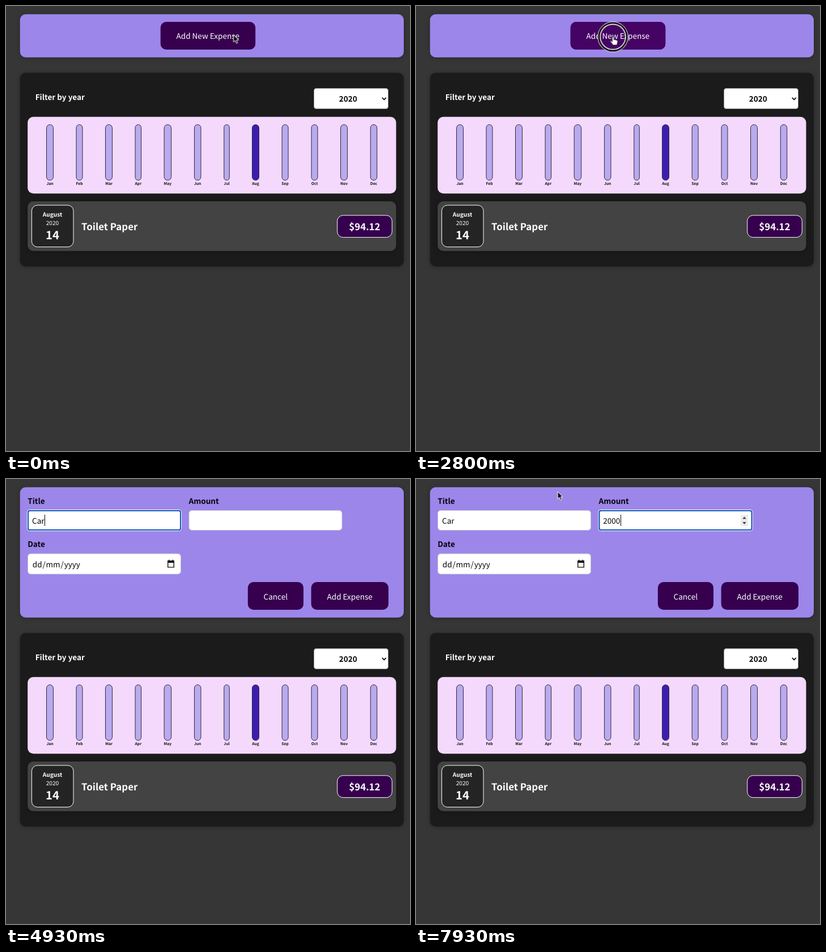
Animation, 713 px wide and 786 px high, one loop 8000 ms. Source, as an HTML page:

```html
<!DOCTYPE html>
<html lang="en">
<head>
<meta charset="utf-8">
<title>Expense tracker</title>
<style>
html, body { margin: 0; width: 100%; height: 100%; overflow: hidden; background: #363636; }
svg { display: block; width: 713px; height: 786px; }
text {
  font: 13.54px "Noto Sans CJK JP", "Noto Sans CJK SC", "Noto Sans CJK KR", "Noto Sans", sans-serif;
  fill: #fff; text-rendering: geometricPrecision; white-space: pre;
}
.bold { font-weight: 700; }
.mid { text-anchor: middle; }
.dark { fill: #060308; }
.big { font-size: 16.92px; }
.small { font-size: 10.15px; }
.day { font-size: 20.3px; }
.month { font-size: 6.77px; fill: #111; }
.shadow { filter: drop-shadow(0 1px 3.5px rgba(0, 0, 0, .28)); }
.lilac { fill: #9c86ea; }
.btn { fill: #36004f; }
.field { fill: #fff; stroke: #c4c0d4; }
.bar { fill: #b9a9ee; stroke: #2c2a36; }
.full { fill: #3d1db0; }

/* Everything that switches: hidden at rest, shown by stepped keyframes */
.step { opacity: 0; animation: 8s step-end infinite; }
tspan.step { opacity: 1; fill-opacity: 0; }
#closed { animation-name: closed; }
#open { animation-name: open; }
#hover { animation-name: hover; }
#list { animation: shift 8s step-end infinite; }
#ring { animation-name: ring; }
#arrow { animation-name: arrow; }
#hand { animation-name: hand; }
#beam { animation-name: beam; }
#focusTitle { animation-name: focusTitle; }
#focusAmount { animation-name: focusAmount; }
#spinner { animation-name: spinner; }
#caret { animation-name: blink, caretMove; }
#cursor { animation: path 8s linear infinite; }

@keyframes closed { 0% { opacity: 1 } 35.75%, 100% { opacity: 0 } }
@keyframes open { 35.75% { opacity: 1 } }
@keyframes hover { 31.5% { opacity: 1 } }
@keyframes shift { 35.75% { transform: translateY(154px) } }
@keyframes ring { 33.25% { opacity: 1 } 35.75% { opacity: 0 } 45% { opacity: 1 } 46.75% { opacity: 0 } }
@keyframes arrow {
  0% { opacity: 1 } 31.5% { opacity: 0 } 39.5% { opacity: 1 } 39.9% { opacity: 0 } 95.8%, 100% { opacity: 1 }
}
@keyframes hand { 31.5% { opacity: 1 } 35.75% { opacity: 0 } }
@keyframes beam {
  35.75% { opacity: 1 } 39.5% { opacity: 0 } 39.9% { opacity: 1 }
  57.45% { opacity: 0 } 93.3% { opacity: 1 } 95.8% { opacity: 0 }
}
@keyframes focusTitle { 45% { opacity: 1 } 66.25% { opacity: 0 } }
@keyframes focusAmount { 66.25% { opacity: 1 } }
@keyframes spinner { 35.75% { opacity: 1 } 39.5% { opacity: 0 } 66.25% { opacity: 1 } }
@keyframes blink {
  45% { opacity: 1 } 51.25% { opacity: 0 } 57.45% { opacity: 1 } 65.35% { opacity: 0 }
  66.25% { opacity: 1 } 72.5% { opacity: 0 } 78.3% { opacity: 1 } 89.6% { opacity: 0 } 95.85% { opacity: 1 }
}
@keyframes caretMove {
  0% { transform: translateX(46px) }
  57.45% { transform: translateX(54.6px) }
  58.3% { transform: translateX(62.3px) }
  59.1% { transform: translateX(67.5px) }
  66.25% { transform: translateX(330.5px) }
  78.3% { transform: translateX(338px) }
  80% { transform: translateX(345.5px) }
  81.6% { transform: translateX(353px) }
  83.3%, 100% { transform: translateX(360.5px) }
}
@keyframes path {
  0% { transform: translate(401.5px, 51px) }
  21.6% { transform: translate(358.5px, 54px) }
  28.4% { transform: translate(347.5px, 54.5px) }
  38% { transform: translate(347.5px, 54.5px); animation-timing-function: ease-in-out }
  43.75% { transform: translate(164px, 75px) }
  93.3% { transform: translate(164px, 75px); animation-timing-function: ease-in-out }
  99.1%, 100% { transform: translate(250px, 22.5px) }
}
/* Typed characters */
#k1 { animation-name: k1 } @keyframes k1 { 57.45% { fill-opacity: 1 } }
#k2 { animation-name: k2 } @keyframes k2 { 58.3% { fill-opacity: 1 } }
#k3 { animation-name: k3 } @keyframes k3 { 59.1% { fill-opacity: 1 } }
#k4 { animation-name: k4 } @keyframes k4 { 78.3% { fill-opacity: 1 } }
#k5 { animation-name: k5 } @keyframes k5 { 80% { fill-opacity: 1 } }
#k6 { animation-name: k6 } @keyframes k6 { 81.6% { fill-opacity: 1 } }
#k7 { animation-name: k7 } @keyframes k7 { 83.3% { fill-opacity: 1 } }
</style>
</head>
<body>
<svg viewBox="0 0 713 786">
  <rect width="713" height="786" fill="#363636"/>

  <g id="closed" class="step">
    <rect class="lilac shadow" x="24.7" y="14.5" width="677.3" height="76.3" rx="10"/>
    <rect class="btn" x="272.7" y="28" width="167.5" height="49" rx="10"/>
    <rect id="hover" class="step" fill="#450464" x="272.7" y="28" width="167.5" height="49" rx="10"/>
    <text class="mid" x="356.3" y="58.3">Add New Expense</text>
  </g>

  <g id="open" class="step">
    <rect class="lilac shadow" x="24.7" y="14.5" width="677.3" height="230.3" rx="10"/>
    <text class="bold dark" x="38.2" y="44">Title</text>
    <text class="bold dark" x="322.5" y="44">Amount</text>
    <text class="bold dark" x="38.2" y="120.3">Date</text>
    <rect class="field" x="38.5" y="55.5" width="270" height="35" rx="5"/>
    <rect class="field" x="323" y="55.5" width="270" height="35" rx="5"/>
    <rect class="field" x="38.5" y="132" width="270" height="36" rx="5"/>

    <g id="focusTitle" class="step" fill="none">
      <rect x="37.5" y="54.5" width="272" height="37" rx="4" stroke="#fff"/>
      <rect x="39" y="56" width="269" height="34" rx="3" stroke="#1354b4" stroke-width="2"/>
    </g>
    <g id="focusAmount" class="step" fill="none">
      <rect x="322" y="54.5" width="272" height="37" rx="4" stroke="#fff"/>
      <rect x="323.5" y="56" width="269" height="34" rx="3" stroke="#1354b4" stroke-width="2"/>
    </g>

    <g id="spinner" class="step">
      <rect x="573" y="63" width="13" height="20" fill="#ececec"/>
      <path d="M576.3 70.5l3.2-4 3.2 4zM576.3 76l3.2 4 3.2-4z" fill="#3c3c3c"/>
    </g>

    <text class="dark" x="46" y="78.8"><tspan id="k1" class="step">C</tspan><tspan id="k2" class="step">a</tspan><tspan id="k3" class="step">r</tspan></text>
    <text class="dark" x="330.3" y="78.8"><tspan id="k4" class="step">2</tspan><tspan id="k5" class="step">0</tspan><tspan id="k6" class="step">0</tspan><tspan id="k7" class="step">0</tspan></text>
    <rect id="caret" class="step" y="63" width="1" height="20" fill="#000"/>

    <text class="dark" x="46.8" y="155.8">dd<tspan dx=".85">/</tspan><tspan dx=".85">mm</tspan><tspan dx=".85">/</tspan><tspan dx=".85">yyyy</tspan></text>
    <path d="M285.7 144.7h10.6v11.2h-10.6z" fill="none" stroke="#111" stroke-width="1.4"/>
    <path d="M285 144h12v4h-12zM287 142.5h1.5v2H287zM293.5 142.5h1.5v2h-1.5z" fill="#111"/>

    <rect class="btn" x="426.8" y="182" width="98.2" height="49" rx="10"/>
    <text class="mid" x="475.8" y="212.5">Cancel</text>
    <rect class="btn" x="538.6" y="182" width="136.4" height="49" rx="10"/>
    <text class="mid" x="606.7" y="212.5">Add Expense</text>
  </g>

  <g id="list">
    <rect class="shadow" x="24.7" y="118" width="677.3" height="342" rx="10" fill="#1b1b1b"/>
    <text class="bold" x="51.7" y="166">Filter by year</text>
    <rect x="543.5" y="145.5" width="131" height="36" rx="4" fill="#fff" stroke="#8a8a8a"/>
    <text class="bold dark mid" x="603.7" y="169.2">2020</text>
    <path d="M663.8 161.8l3.5 3.6 3.5-3.6" fill="none" stroke="#111" stroke-width="1.8"/>

    <rect x="38.2" y="195.8" width="650.3" height="135.4" rx="10" fill="#f4d9fd"/>
    <g id="chart"></g>

    <rect class="shadow" x="38.2" y="345" width="650.3" height="87.7" rx="10" fill="#434343"/>
    <rect x="45.4" y="351.9" width="73.6" height="73.6" rx="10" fill="#242424" stroke="#fff"/>
    <text class="bold small mid" x="82" y="372">August</text>
    <text class="small mid" x="82" y="386.6">2020</text>
    <text class="bold day mid" x="82" y="412.2">14</text>
    <text class="bold big" x="133" y="396.4">Toilet Paper</text>
    <rect x="584.7" y="369.8" width="96.6" height="38.8" rx="10" fill="#36004f" stroke="#fff"/>
    <text class="bold big mid" x="632.9" y="396.4">$94.12</text>
  </g>

  <g id="cursor">
    <g id="ring" class="step" fill="none">
      <circle r="24.3" stroke="#fff" stroke-width="5.4"/>
      <circle r="24.6" stroke="#000" stroke-width="2.8"/>
    </g>
    <path id="arrow" class="step" d="M0 0v12.6l2.9-2.7 2.2 5 2.2-1-2.1-4.8h3.9z" fill="#0b0b0b" stroke="#fff" stroke-width="1"/>
    <path id="hand" class="step" d="M-1.5 1c0-1.8 2.7-1.8 2.9 0l.5 4.2c.4-1 2.3-.8 2.5.4.6-.8 2.1-.4 2.2.7.9-.5 1.8 0 1.8 1.2 0 3-.9 4.3-1.3 7H.2c-1-2.3-3.3-3.8-4.5-6.2-.6-1.4 1-2.1 2-1.1l1.4 1.4z" fill="#fff" stroke="#111" stroke-width=".9"/>
    <g id="beam" class="step" fill="none">
      <path d="M-3-6.5q3 0 3 2v9q0 2-3 2M3-6.5q-3 0-3 2v9q0 2 3 2M-1.7 2h3.4" stroke="#fff" stroke-opacity=".6" stroke-width="2.4"/>
      <path d="M-3-6.5q3 0 3 2v9q0 2-3 2M3-6.5q-3 0-3 2v9q0 2 3 2M-1.7 2h3.4" stroke="#111" stroke-width="1.1"/>
    </g>
  </g>
</svg>
<script>
// Month: bar centre and width
const months = {
  Jan: [77.5, 12], Feb: [129.5, 11], Mar: [181.5, 12], Apr: [233.3, 10.5],
  May: [285.4, 12.5], Jun: [338.2, 11.5], Jul: [389.5, 9.5], Aug: [440.5, 12],
  Sep: [492.6, 11], Oct: [544.5, 11], Nov: [596.5, 12], Dec: [649, 11.5]
};
document.getElementById('chart').innerHTML = Object.entries(months).map(([name, [x, w]]) =>
  `<rect class="bar ${name === 'Aug' ? 'full' : ''}" x="${x - w / 2}" y="209.5" width="${w}" height="98.3" rx="${w / 2}"/>
   <text class="month bold mid" x="${x}" y="316">${name}</text>`).join('');
</script>
</body>
</html>
```
